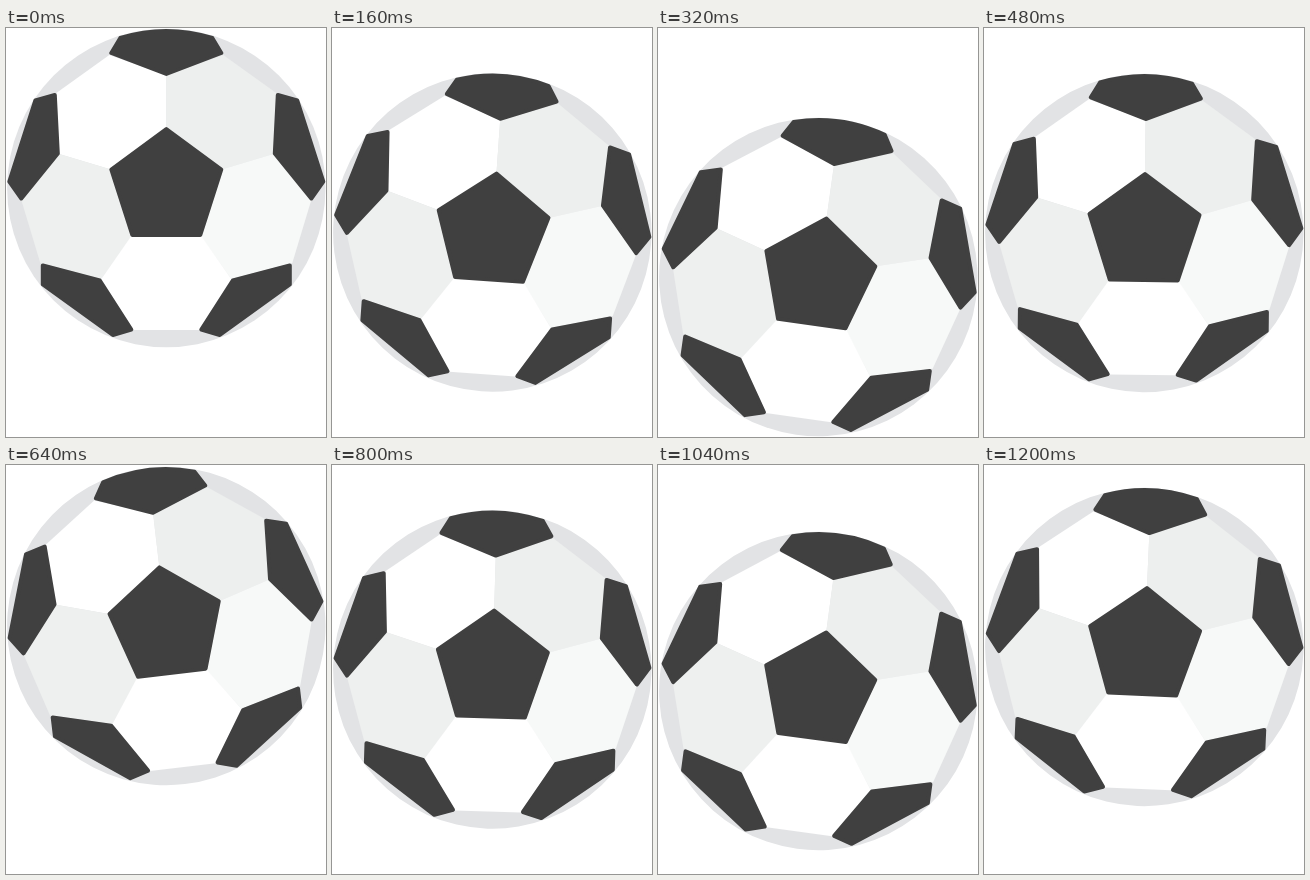
Animation, 320 px wide and 409 px high, one loop 1280 ms. Source, as an HTML page:

```html
<!DOCTYPE html>
<html lang="en">
<head>
<meta charset="utf-8">
<title>Bouncing ball</title>
<style>
  html, body { margin: 0; width: 100%; height: 100%; overflow: hidden; background: #fff; }
  svg { display: block; width: 320px; height: 409px; }
  .dark { fill: #404040; stroke: #404040; stroke-width: 4; stroke-linejoin: round; }
</style>
</head>
<body>
<svg viewBox="0 0 320 409">
  <defs>
    <path id="upper" d="M0 -113V-60L-57 -19L-107 -34L-110 -95L-57 -133Z"/>
    <path id="side" d="M-57 -19L-35 49L-65 91L-126 75L-145 12L-107 -34Z"/>
    <g id="patches" class="dark">
      <path d="M-111.5 -93L-131 -87.5L-157 -6.5L-145 10.5L-108.5 -34.5Z"/>
      <path d="M-123.5 77.5L-66.5 92.5L-35 141.5L-53.5 147L-123.5 96.5Z"/>
    </g>
  </defs>
  <g id="ball">
    <circle r="159.2" fill="#e2e3e5"/>
    <use href="#upper" fill="#fff"/>
    <use href="#upper" fill="#edefee" transform="scale(-1 1)"/>
    <use href="#side" fill="#eef0ef"/>
    <use href="#side" fill="#f7f9f8" transform="scale(-1 1)"/>
    <path fill="#fff" d="M-35 48H35L65 91L33 142H-33L-65 91Z"/>
    <use href="#patches"/>
    <use href="#patches" transform="scale(-1 1)"/>
    <g class="dark">
      <path d="M0 -59L55 -18.5L34 47H-34L-55 -18.5Z"/>
      <path d="M-55 -135L0 -114L55 -135L46 -150A157 157 0 0 0 -46 -150Z"/>
    </g>
  </g>
</svg>
<script>
  const LOOP = 1280, STEP = 80, LEG = 320;
  const X = 160.3, Y = 160;
  // Height and tilt at each end of the four legs
  const drops = [0, 89, 1, 88, 0];
  const tilts = [0, 8, -6.7, 10.2, 0];
  const ball = document.getElementById("ball");

  function along(keys, t) {
    const i = Math.floor(t / LEG);
    return keys[i] + (keys[i + 1] - keys[i]) * (t / LEG - i);
  }

  function draw(time) {
    const t = Math.floor((time % LOOP) / STEP) * STEP;
    ball.setAttribute("transform",
      `translate(${X} ${Y + along(drops, t)}) rotate(${along(tilts, t)})`);
  }

  let start;
  function tick(now) {
    start ??= now;
    draw(now - start);
    requestAnimationFrame(tick);
  }
  draw(0);
  requestAnimationFrame(tick);
</script>
</body>
</html>
```
